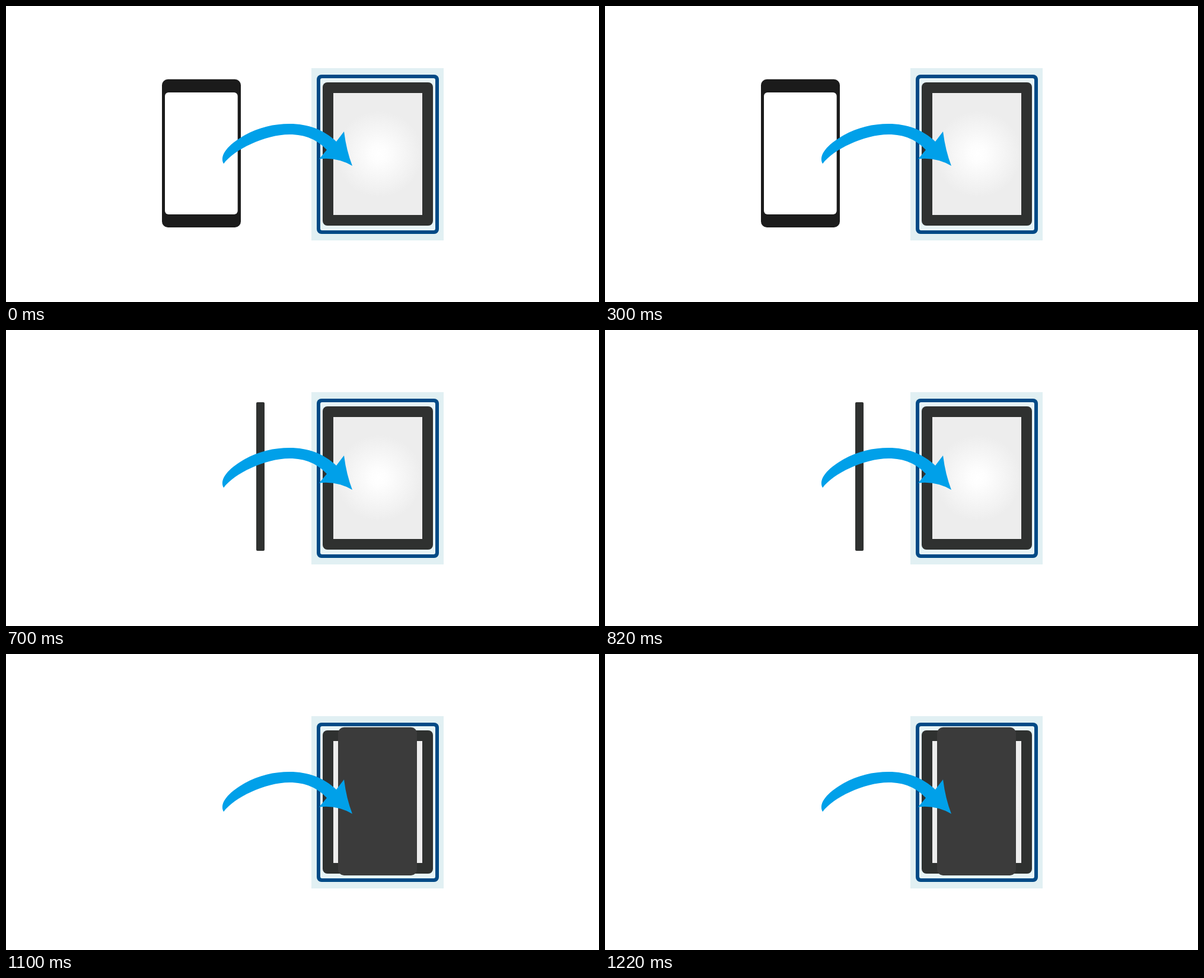
These frames come from a looping animation (1000x500 px, 1300 ms). An HTML page with a canvas:

```html
<!DOCTYPE html>
<html lang="en">
<head>
<meta charset="utf-8">
<title>Phone onto reader</title>
<style>
html, body { margin: 0; width: 100%; height: 100%; overflow: hidden; background: #fff; }
canvas { display: block; width: 1000px; height: 500px; }
</style>
</head>
<body>
<canvas id="stage" width="1000" height="500"></canvas>
<script>
const ctx = document.getElementById('stage').getContext('2d');
const LOOP = 1300;
const SLOPE = -0.257;
const BLACK = '#1b1b1b', BACK = '#3b3b3b', FRAME = '#2f3130';

const arrow = new Path2D(
  'M367 266.5 C359 252 375 234 402 218.5 C426 205 452 199 478 199 ' +
  'C510 199 536 209 557 229 L570 212 Q574 244 584 270 Q558 255 528 258.5 ' +
  'L541 243 C525 226 505 217 478 217 C437 217 384 243 367 266.5 Z');

function box(x, y, w, h, r, fill) {
  ctx.beginPath();
  ctx.roundRect(x, y, w, h, r);
  ctx.fillStyle = fill;
  ctx.fill();
}

// A box whose top edge rises to the right; y is its height at the left side.
function slantBox(x, y, w, h, r, fill) {
  ctx.save();
  ctx.transform(1, SLOPE, 0, 1, x, y);
  box(0, 0, w, h, r, fill);
  ctx.restore();
}

function drawReader() {
  box(515, 105, 223, 291, 0, '#e1f0f3');
  box(524, 116, 206, 269, 8, '#004a86');
  box(530, 122, 194, 257, 3, '#e7f4f6');
  box(534, 129, 186, 242, 8, FRAME);
  const glow = ctx.createRadialGradient(629, 250, 0, 629, 250, 73);
  glow.addColorStop(0, '#fff');
  glow.addColorStop(0.2, '#fdfdfd');
  glow.addColorStop(1, '#ededed');
  box(552, 147, 150, 206, 0, glow);
}

function drawArrow() {
  ctx.fillStyle = '#00a0e9';
  ctx.fill(arrow);
}

function phoneFront() {
  box(263, 123.7, 133, 250.3, 10, BLACK);
  box(268, 146, 122.7, 206, 6, '#fff');
}

function phoneTurned() {
  slantBox(288, 156.3, 124, 250, 9, BACK);
  slantBox(295, 154.7, 117, 249.3, 9, BLACK);
  slantBox(299.7, 175.7, 107.6, 206, 6, '#fff');
}

function phoneEdge() {
  box(422, 122, 14, 251, 2, FRAME);
}

function phoneTurnedAway() {
  ctx.save();
  ctx.transform(-1, 0, 0, 1, 865, 0);
  slantBox(288, 156.3, 124, 250, 9, BACK);
  ctx.restore();
}

function phoneBack() {
  box(560, 123.7, 133, 250.3, 10, BACK);
}

const poses = [
  { until: 500, phone: phoneFront, arrow: true },
  { until: 700, phone: phoneTurned },
  { until: 900, phone: phoneEdge, arrow: true },
  { until: 1100, phone: phoneTurnedAway },
  { until: LOOP, phone: phoneBack, arrow: true }
];

const start = performance.now();

function render() {
  const t = (performance.now() - start) % LOOP;
  const pose = poses.find(p => t < p.until);
  ctx.fillStyle = '#fff';
  ctx.fillRect(0, 0, 1000, 500);
  drawReader();
  pose.phone();
  if (pose.arrow) drawArrow();
  requestAnimationFrame(render);
}
render();
</script>
</body>
</html>
```
